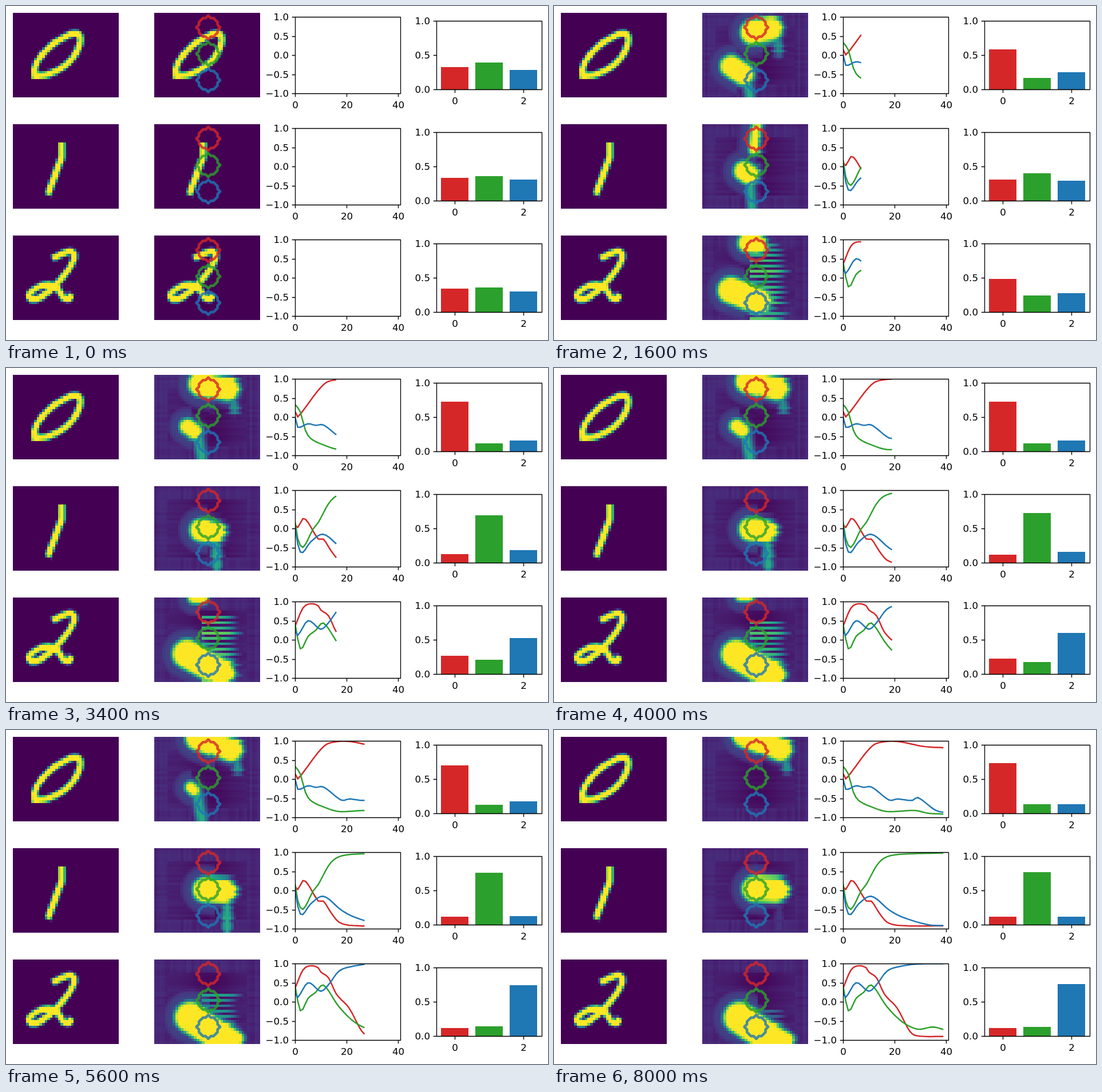
Write an HTML page with a canvas that moves like this. It is 947 px wide and 585 px high and loops after 8200 ms.

```html
<!DOCTYPE html>
<html>
<head>
<meta charset="utf-8">
<style>
html, body { margin: 0; width: 100%; height: 100%; overflow: hidden; background: #fff; }
canvas { display: block; }
</style>
</head>
<body>
<canvas id="stage" width="947" height="585"></canvas>
<script>
const ctx = document.getElementById('stage').getContext('2d');
const CELL = 4.625, COLS = 40, ROWS = 32, STEPS = 41, STEP_MS = 200;
const COLORS = ['#d62728', '#2ca02c', '#1f77b4'];
const VIRIDIS = ['440154', '482878', '3e4989', '31688e', '26828e', '1f9e89', '35b779', '6ece58', 'b5de2b', 'fde725']
  .map(h => [0, 2, 4].map(i => parseInt(h.substr(i, 2), 16)));

const clamp = v => Math.max(0, Math.min(1, v));
const mix = (a, b, t) => a + (b - a) * t;
const sigmoid = v => 1 / (1 + Math.exp(-v));
const hash = (a, b = 0) => { const s = Math.sin(a * 127.1 + b * 311.7) * 43758.5453; return s - Math.floor(s); };

function viridis(v) {
  const p = clamp(v) * 9, i = Math.min(8, Math.floor(p));
  return 'rgb(' + VIRIDIS[i].map((c, k) => Math.round(mix(c, VIRIDIS[i + 1][k], p - i))) + ')';
}

// Smooth curve through a few "x y" points, sampled at every step
function curve(points) {
  const keys = points.split(', ').map(p => p.split(' ').map(Number)), last = keys.length - 1;
  const slope = i => {
    const a = keys[Math.max(0, i - 1)], b = keys[Math.min(last, i + 1)];
    return (b[1] - a[1]) / (b[0] - a[0]);
  };
  return Array.from({ length: STEPS }, (_, n) => {
    let i = 0;
    while (i < last - 1 && keys[i + 1][0] <= n) i++;
    const [x0, y0] = keys[i], [x1, y1] = keys[i + 1];
    const h = x1 - x0, t = (n - x0) / h, u = 1 - t;
    return y0 * (1 + 2 * t) * u * u + h * slope(i) * t * u * u
      + y1 * t * t * (3 - 2 * t) - h * slope(i + 1) * t * t * u;
  });
}

// A thin-tipped digit stroke rasterised to one value per cell
function rasterise(path) {
  const pad = document.createElement('canvas').getContext('2d');
  pad.lineWidth = 2.5;
  pad.stroke(new Path2D(path));
  const { data, width } = pad.getImageData(0, 0, COLS, ROWS);
  return Array.from({ length: COLS * ROWS }, (_, i) => data[i * 4 + 3] / 255);
}

// Capsule x1, y1, x2, y2, radius that eases between two poses and fades before `end`
const blob = (from, to, end = 48, power = 1, glow = power == 1) => n => {
  const t = clamp((n - 4) / (Math.min(end, 40) - 4)), p = t * (2 - t);
  return { shape: from.map((v, i) => mix(v, to[i], p)), power: power * clamp((end - n) / 8), glow };
};

const rows = [
  {
    digit: rasterise('M8.3 23.8C7 19 11 15.5 14 12.8S22.5 7.2 24.5 8S25.5 13.5 22.5 17.2S13.5 24.3 8.3 23.8Z'),
    blobs: [
      blob([20, 9.5, 25, 6.5, 4.8], [16, -.8, 29.5, 4.8, 4.8]),
      blob([10, 20.6, 15.4, 24, 4.9], [14, 19, 15, 20, 2], 36),
      blob([17, 25, 18, 32, 1.5], [16, 20, 18, 32, 1.8], 38, .6),
      blob([27, 5, 28, 15, 1.6], [31, 5, 32, 12, 1.6], 48, .5)
    ],
    curves: [
      curve('0 .15, 1 .01, 2 .08, 11 .85, 16 .98, 22 .98, 31 .86, 40 .82'),
      curve('0 .33, 2 .14, 4 -.34, 6 -.55, 11 -.72, 17 -.84, 28 -.815, 33 -.885, 40 -.91'),
      curve('0 0, 1 -.26, 2 -.26, 5 -.17, 8 -.21, 11 -.2, 18 -.545, 21 -.515, 27 -.55, 29 -.475, 36 -.81, 40 -.87')
    ]
  },
  {
    digit: rasterise('M18.4 7V12.5L13.2 26.8'),
    blobs: [
      blob([19.6, 4, 17.6, 9, 2.6], [21, 0, 21, 10, 1.4], 16),
      blob([14.5, 18.4, 15, 20, 3.5], [20, 15.4, 27.6, 15.8, 5]),
      blob([15, 22, 16, 32, 1.5], [29, 20, 29, 32, 1.5], 42, .6)
    ],
    curves: [
      curve('0 .1, 1 .03, 3.5 .27, 9 -.27, 11 -.275, 14 -.58, 17 -.82, 22 -.91, 40 -.92'),
      curve('0 .17, 1 -.26, 3 -.49, 7 -.01, 9 .16, 13 .65, 16 .85, 21 .94, 40 .985'),
      curve('0 .03, 1 -.4, 2.5 -.64, 6 -.35, 11 -.15, 18 -.51, 23 -.69, 33 -.89, 40 -.915')
    ]
  },
  {
    digit: rasterise('M15 8.8C18 7 23.5 4 23.2 8S19 15.5 16 18.8S7.5 26 6.3 23.5S12 17.5 15.5 19S17.5 24 20 24S21.5 23 22 22'),
    blobs: [
      blob([18.4, 4.5, 22.4, 5, 4.6], [14, -1, 17, -1, 1.5], 28),
      blob([10, 20.4, 19, 22.5, 4.9], [14, 22, 29, 32, 6])
    ],
    striped: true,
    curves: [
      curve('0 .36, 3 .83, 6 .945, 9 .89, 10 .78, 13 .63, 16 .21, 21 -.16, 26 -.77, 29 -.885, 40 -.9'),
      curve('0 .41, 2 -.23, 5 .09, 8 .25, 11 .44, 17 -.12, 23 -.52, 29 -.71, 35 -.655, 40 -.74'),
      curve('0 .23, 1 .12, 5 .5, 10 .28, 13 .45, 17 .8, 22 .925, 29 .99, 40 .999')
    ]
  }
];

function segDist(px, py, x1, y1, x2, y2) {
  const dx = x2 - x1, dy = y2 - y1;
  const t = clamp(((px - x1) * dx + (py - y1) * dy) / (dx * dx + dy * dy));
  return Math.hypot(px - x1 - t * dx, py - y1 - t * dy);
}

function background(c, r, seed) {
  const edge = Math.min(c, 39 - c, r, 31 - r);
  const dip = .06 * Math.exp(-(((c - 21) / 9) ** 2));
  return edge < 5 ? .07 + hash(c, seed) * .04 + hash(r, seed) * .03 : .08 - dip + hash(r, seed + 7) * .03;
}

// Bright horizontal streaks whose upper limit sinks with time
function streak(x, r, n) {
  if (x < 18 || r % 2 == 0 || r < n / 2 - 2) return 0;
  return clamp(n / 10) * (1 - n / 60) * (.8 + .3 * hash(r, 3)) * sigmoid((27 + 5 * hash(r, 9) - x) / 1.3);
}

function field(row, n, seed) {
  const grow = Math.min(1, n / 4), blobs = row.blobs.map(b => b(n));
  return (c, r) => {
    const digit = row.digit[r * COLS + c], x = c + .5, y = r + .5;
    if (!n) return digit;
    let v = background(c, r, seed);
    for (const { shape: [x1, y1, x2, y2, radius], power, glow } of blobs) {
      const d = segDist(x, y, x1, y1, x2, y2) + (x > 21 ? (hash(r, seed) - .5) * 1.2 : 0);
      const size = radius * (.5 + grow / 2);
      const reach = x < (x1 + x2) / 2 ? 4.5 : 2;
      v = Math.max(v, power * Math.min(1, 1.25 * sigmoid((size - d) / .7)),
        glow ? power * .2 * sigmoid((size + reach - d) / .7) : 0);
    }
    if (row.striped) v = Math.max(v, streak(x, r, n));
    return Math.max(v * grow, digit * (1 - grow));
  };
}

function heatmap(x0, y0, value) {
  for (let r = 0; r < ROWS; r++) for (let c = 0; c < COLS; c++) {
    const x = Math.round(x0 + c * CELL), y = Math.round(y0 + r * CELL);
    ctx.fillStyle = viridis(value(c, r));
    ctx.fillRect(x, y, Math.round(x0 + (c + 1) * CELL) - x, Math.round(y0 + (r + 1) * CELL) - y);
  }
}

// Outline of a pixelated disc: one quarter, turned four times
const QUARTER = [[0, -4.5], [.5, -4], [1, -3.5], [2, -3.5], [2.5, -3], [3, -2.5], [3.5, -2], [3.5, -1], [4, -.5]];
function ring(x, y, color) {
  ctx.beginPath();
  for (let q = 0; q < 4; q++) for (let [a, b] of QUARTER) {
    for (let k = 0; k < q; k++) [a, b] = [-b, a];
    ctx.lineTo(x + a * CELL, y + b * CELL);
  }
  ctx.closePath();
  ctx.strokeStyle = color;
  ctx.lineWidth = 4.6;
  ctx.globalAlpha = .8;
  ctx.stroke();
  ctx.globalAlpha = 1;
}

function axes(x, y, w, h, xTicks, yTicks) {
  ctx.strokeStyle = ctx.fillStyle = '#000';
  ctx.lineWidth = 1.33;
  ctx.strokeRect(x, y, w, h);
  ctx.beginPath();
  ctx.textAlign = 'center';
  for (const [tx, label] of xTicks) {
    ctx.moveTo(tx, y + h); ctx.lineTo(tx, y + h + 5.8);
    ctx.fillText(label, tx, Math.round(y + h + 25.3));
  }
  ctx.textAlign = 'right';
  yTicks.forEach((label, i) => {
    const ty = Math.floor(y + h * i / (yTicks.length - 1)) + .5;
    ctx.moveTo(x, ty); ctx.lineTo(x - 5.8, ty);
    ctx.fillText(label, x - 11.5, Math.round(ty + 5.7));
  });
  ctx.stroke();
}

function linePlot(curves, n, y) {
  ctx.save();
  ctx.beginPath();
  ctx.rect(505, y, 184.5, 134.5);
  ctx.clip();
  ctx.lineWidth = 2.5;
  curves.forEach((values, k) => {
    ctx.beginPath();
    for (let i = 0; i < n; i++) ctx.lineTo(505.2 + i * 4.49, y - .3 + 67.1 * (1 - values[i]));
    ctx.strokeStyle = COLORS[k];
    if (n > 1) ctx.stroke();
  });
  ctx.restore();
  axes(505.5, y, 184, 134, [[505.5, '0'], [595.5, '20'], [685.5, '40']], ['1.0', '0.5', '0.0', '−0.5', '−1.0']);
}

// Bar heights are the softmax of the current curve values
function barPlot(curves, n, y) {
  const e = curves.map(v => Math.exp(v[n])), sum = e[0] + e[1] + e[2], base = y + 119.5;
  e.forEach((v, k) => {
    const top = Math.round(base - 120 * v / sum);
    ctx.fillStyle = COLORS[k];
    ctx.fillRect(760 + 60 * k, top, 48, base - top);
  });
  axes(752.5, y, 184, 120, [[784.5, '0'], [904.5, '2']], ['1.0', '0.5', '0.0']);
}

function draw(n) {
  ctx.fillStyle = '#fff';
  ctx.fillRect(0, 0, 947, 585);
  ctx.font = '16.67px "DejaVu Sans", sans-serif';
  ctx.lineJoin = 'round';
  rows.forEach((row, k) => {
    const top = 12 + 195 * k;
    heatmap(12, top, (c, r) => row.digit[r * COLS + c]);
    heatmap(259, top, field(row, n, k + 1));
    COLORS.forEach((color, i) => ring(353.4, top + (5.5 + 10 * i) * CELL, color));
    linePlot(row.curves, n, top + 7.5);
    barPlot(row.curves, n, top + 14.5);
  });
}

let shown = -1;
function tick() {
  const n = Math.floor(performance.now() / STEP_MS) % STEPS;
  if (n != shown) draw(shown = n);
  requestAnimationFrame(tick);
}
tick();
</script>
</body>
</html>
```
